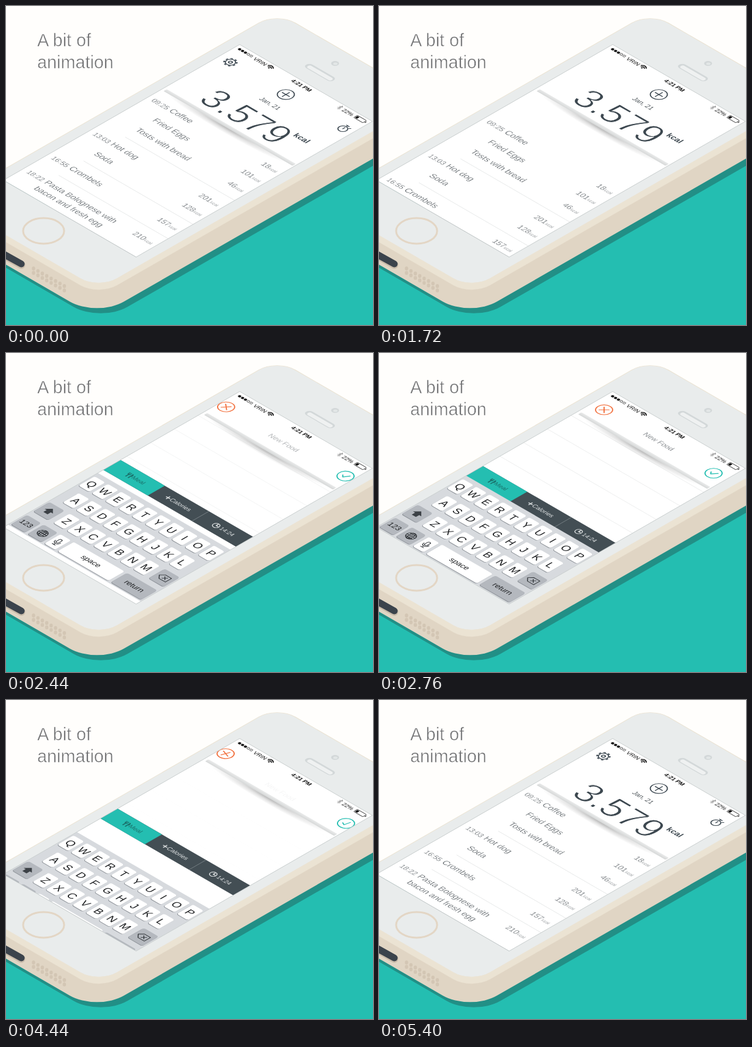
Write an HTML page that moves like this. It is 600x522 px and loops after 5.44 s.

```html
<!DOCTYPE html>
<html lang="en">
<head>
<meta charset="utf-8">
<title>A bit of animation</title>
<style>
html, body { margin: 0; width: 100%; height: 100%; overflow: hidden; background: #fffefc; }
svg { display: block; width: 600px; height: 522px; font-family: "Liberation Sans", Arial, sans-serif; }
.line { fill: none; stroke-width: 2; stroke-linecap: round; stroke-linejoin: round; }
.thin { stroke: #fff; stroke-width: .4; }
.mid { text-anchor: middle; }
.end { text-anchor: end; }
</style>
</head>
<body>
<svg viewBox="0 0 600 522">
  <defs>
    <rect id="face" x="-22" y="-112" width="364" height="792" rx="44" transform="matrix(.678 .393 -.68 .391 382 63)"/>
    <rect id="base" x="-22" y="-112" width="364" height="792" rx="65" transform="matrix(.678 .393 -.68 .391 382 63)"/>
    <clipPath id="glass"><rect width="320" height="568"/></clipPath>
    <clipPath id="below"><rect y="7" width="320" height="30"/></clipPath>
    <radialGradient id="shade">
      <stop offset="0" stop-opacity=".3"/><stop offset=".5" stop-opacity=".11"/><stop offset="1" stop-opacity="0"/>
    </radialGradient>
    <linearGradient id="lip" x2="0" y2="1">
      <stop offset="0" stop-color="#eaebeb"/><stop offset="1" stop-color="#d6d8d8"/>
    </linearGradient>
  </defs>

  <path d="M0 350 600 150V522H0Z" fill="#24beb1"/>
  <use href="#base" x="3" y="54.500" fill="#228f86"/>
  <use href="#base" x="-3" y="46" fill="#e0d5c4"/>
  <use href="#face" y="11" fill="#ebe3d3"/>
  <use href="#face" fill="#e9ecec" stroke="#ebe3d3" stroke-width="1.500"/>
  <path d="M-12 403 25 423.500" stroke="#c9bcaa" stroke-width="13" stroke-linecap="round"/>
  <path d="M-12 401.500 25 422" stroke="#3b434c" stroke-width="11" stroke-linecap="round"/>
  <g id="holes" fill="#d3c6b4"></g>
  <ellipse cx="61.500" cy="368" rx="33.500" ry="21" fill="none" stroke="#e3d6c5" stroke-width="3"/>
  <ellipse cx="538" cy="94" rx="6.500" ry="4" fill="#d3d8d9"/>
  <ellipse cx="538.500" cy="94.500" rx="3.500" ry="2" fill="#e3e7e7"/>

  <text fill="#707173" font-size="28.800" stroke="#fffefc" stroke-width=".6">
    <tspan x="51" y="66">A bit of</tspan><tspan x="51" y="102">animation</tspan>
  </text>

  <g transform="matrix(.678 .393 -.68 .391 382 63)">
    <rect x="122" y="-46" width="66" height="15" rx="7.500" fill="#d3d8d9"/>
    <rect x="127" y="-42" width="58" height="9" rx="4.500" fill="#eff1f1"/>
    <rect width="320" height="568" fill="#fff"/>
    <g clip-path="url(#glass)">
      <g id="list" fill="#50575c" font-size="17.500" class="thin"></g>
      <path id="rules" d="M0 100H320M0 157H320M0 214H320M0 271H320" stroke="#ebecec" fill="none"/>

      <g id="tabs" font-size="13">
        <rect width="320" height="41" fill="#434e54"/>
        <rect width="107" height="41" fill="#24beb1"/>
        <path d="M213.500 0V41" stroke="#7b8489"/>
        <g fill="#1b716b">
          <path d="M37 14h1.500v4h1v-4h1v4h1v-4H43v6l-1.500 1v7h-2.500v-7l-2-1zM45 14q4 0 4 8h-1.500v6H45z"/>
          <text x="50" y="25">Meal</text>
        </g>
        <g fill="#e3e6e7">
          <text x="142" y="25">Calories</text>
          <text x="262" y="25" font-size="12.500">14:24</text>
          <path d="M132 21h8M136 17v8M252 16v5h4" class="line" stroke="#e3e6e7"/>
          <circle cx="252" cy="21" r="6.500" class="line" stroke="#e3e6e7" style="stroke-width:1.500"/>
        </g>
      </g>

      <g id="keyboard"><rect width="320" height="216" fill="#d7dade"/></g>

      <rect id="sheet" width="320" height="182" fill="#fff"/>
      <g id="edge">
        <ellipse cx="160" cy="7" rx="145" ry="15" fill="url(#shade)" clip-path="url(#below)"/>
        <rect x="6" width="311" height="8" rx="2" fill="url(#lip)"/>
      </g>

      <g id="total" fill="#3d4850">
        <text x="160" y="91" font-size="14" class="mid" fill="#50575c">Jan, 21</text>
        <text x="65" y="168" font-size="75" stroke="#fff" stroke-width="1.800">3.579</text>
        <text x="254" y="126" font-size="17" font-weight="700">kcal</text>
      </g>
      <text id="heading" x="160" class="mid thin" font-size="15" fill="#5a6065">New Food</text>

      <g id="gear" class="line" stroke="#434e57">
        <circle r="8.800"/><circle r="3.200"/>
        <circle r="11" pathLength="16" stroke-dasharray="1" stroke-linecap="butt" style="stroke-width:2.600"/>
      </g>
      <g id="timer" class="line" stroke="#434e57">
        <circle r="8.500"/><path d="M0 0V-5M0-9V-12M-3-12H3M7-8 9-10"/>
      </g>
      <g id="plus" class="line" stroke="#434e57"><circle r="14.500"/><path d="M-8.500 0H8.500M0-8.500V8.500"/></g>
      <g id="accept" class="line" stroke="#24beb1"><circle r="14.500"/><path d="M-6 0-2 5 6-5"/></g>
      <g id="cancel" class="line" stroke="#f2713f"><circle r="14.500"/><path d="M-6-6 6 6M-6 6 6-6"/></g>

      <rect width="320" height="20" fill="#fff"/>
      <g id="status" font-size="12" fill="#111">
        <text x="46" y="15">VRIN</text>
        <path d="M78 9q6-6 12 0M80 11.500q4-4 8 0" class="line" stroke="#111"/>
        <circle cx="84" cy="13.500" r="1.500"/>
        <text x="160" y="15" class="mid" font-weight="700">4:21 PM</text>
        <path d="M249 7l6 6-3 3V4l3 3-6 6" class="line" stroke="#999" style="stroke-width:1.200"/>
        <text x="260" y="15">22%</text>
        <rect x="289.500" y="5.500" width="22" height="9" rx="1.500" fill="none" stroke="#222"/>
        <path d="M291 7h5v6h-5zM313 8h1.500v4H313z"/>
      </g>
    </g>
    <rect width="320" height="568" fill="none" stroke="#c3c8c9"/>
  </g>
</svg>
<script>
const $ = id => document.getElementById(id);
const add = (id, markup) => $(id).insertAdjacentHTML('beforeend', markup);

// Static repeats
for (let i = 0; i < 16; i++) {
  const col = i % 8, row = i >> 3;
  add('holes', `<ellipse cx="${45 + col * 7.2}" cy="${429.5 + col * 4.1 + row * 7.2}" rx="2.700" ry="3.200"/>`);
}
for (let i = 0; i < 5; i++) {
  add('status', `<circle cx="${10 + i * 7}" cy="10" r="2.600" stroke="#111" stroke-width=".8" ${i > 2 ? 'fill="none"' : ''}/>`);
}

const meals = [
  [225, '09:25', 'Coffee', 18], [265, '', 'Fried Eggs', 101], [306, '', 'Tosts with bread', 46],
  [366, '13:03', 'Hot dog', 201], [406, '', 'Soda', 128],
  [466, '16:55', 'Crombels', 157],
  [525, '18:22', 'Pasta Bolognese with', 210], [550, '', 'bacon and fresh egg', 0]
];
for (const [y, time, name, kcal] of meals) {
  add('list', `<text x="11" y="${y}" font-size="15">${time}</text><text x="54" y="${y}">${name}</text>`);
  if (kcal) add('list', `<text x="311" y="${y}" class="end" font-size="16">${kcal}<tspan font-size="9.500" dx="1">kcal</tspan></text>`);
}
add('list', '<path d="M56 331H320M56 431H320M56 491H320" stroke="#e4e6e6" stroke-width="1"/>');

function key(x, y, w, label, { gray = false, size = 22, drop = 8 } = {}) {
  add('keyboard', `<rect x="${x}" y="${y + 1.5}" width="${w}" height="39" rx="4.500" fill="#8f949a"/>
    <rect x="${x}" y="${y}" width="${w}" height="39" rx="4.500" fill="${gray ? '#b4b8be' : '#fff'}"/>
    <text x="${x + w / 2}" y="${y + 19.5 + drop}" class="mid" font-size="${size}" fill="#1c1e20">${label}</text>`);
}
[['QWERTYUIOP', 3, 11], ['ASDFGHJKL', 19, 65], ['ZXCVBNM', 51, 119]].forEach(([row, x, y]) =>
  [...row].forEach((letter, i) => key(x + i * 32, y, 26, letter)));
const gray = { gray: true, size: 16, drop: 5 };
key(3, 119, 36, '', gray);
key(281, 119, 36, '', gray);
key(3, 173, 34, '123', gray);
key(43, 173, 34, '', gray);
key(83, 173, 26, '');
key(115, 173, 123, 'space', { size: 16, drop: 5 });
key(244, 173, 73, 'return', gray);
add('keyboard', `<path d="M21 129 31 139H26V147H16V139H11Z" fill="#3c4146"/>
  <g class="line" stroke="#2c3034" style="stroke-width:1.400">
    <path d="M287 138.500 294 131H309V146H294ZM297 135l7 7M304 135l-7 7"/>
    <circle cx="60" cy="192.500" r="9.500"/><ellipse cx="60" cy="192.500" rx="4.500" ry="9.500"/>
    <path d="M50.500 192.500h19M60 183v19M52.500 187.500h15M52.500 197.500h15"/>
    <rect x="93" y="183" width="6" height="12" rx="3"/><path d="M90 191q0 7 6 7t6-7M96 198v4M92.500 202h7"/>
  </g>`);

// Easing
const S = 1.70158;
const quad = p => p * p;
const cubeIn = p => p ** 3;
const cubeOut = p => 1 - (1 - p) ** 3;
const cubeInOut = p => p < .5 ? 4 * p ** 3 : 1 - 4 * (1 - p) ** 3;
const backIn = p => (S + 1) * p ** 3 - S * p * p;
const backOut = p => 1 - backIn(1 - p);
const clamp = v => Math.min(1, Math.max(0, v));

const LOOP = 5440, STEP = 40, TURN = 3440;
const place = (id, x, y, scale = 1, angle = 0) =>
  $(id).setAttribute('transform', `translate(${x} ${y}) rotate(${angle}) scale(${Math.max(0, scale)})`);
const fade = (id, value) => $(id).setAttribute('opacity', clamp(value));

function draw(t) {
  // 0 on the overview, 1 on the entry form
  const run = (start, span, ease, backStart, backSpan, backEase) => t < TURN
    ? ease(clamp((t - start) / span))
    : 1 - backEase(clamp((t - backStart) / backSpan));

  const panel = run(1800, 790, cubeInOut, 4476, 720, backOut);
  place('edge', 0, 181 - 100 * panel);
  $('sheet').setAttribute('height', 182 - 100 * panel);

  const lift = run(1700, 796, cubeInOut, 4476, 720, backOut);
  const shrink = run(1700, 796, cubeInOut, 4440, 650, cubeOut);
  const size = 1 - .8 * shrink;
  place('total', 160 * (1 - size), 141 - 174 * lift - 141 * size, size);

  const tools = 1 - run(1080, 480, backIn, 4720, 680, backOut);
  place('gear', 26, 48, tools);
  place('timer', 300, 51, tools);
  fade('gear', tools * tools);
  fade('timer', tools * tools);

  const split = 132 * run(1912, 800, backOut, 4127, 720, backIn);
  const spin = run(1912, 800, cubeOut, 4127, 720, quad);
  const grow = Math.min(1, .7 + .45 * spin);
  const angle = -135 * (1 - spin);
  place('cancel', 160 - split, 48.5, grow, angle);
  place('accept', 160 + split, 48.5, grow, angle);
  place('plus', 160, 48.5, 1 - .3 * run(1780, 132, quad, 4847, 300, backOut));
  fade('cancel', spin * 8);
  fade('accept', spin * 8);
  fade('plus', 1 - spin * 8);

  place('list', 0, 420 * run(1300, 700, cubeIn, 4640, 660, cubeOut));
  place('tabs', 0, 568 - 256 * run(2096, 620, backOut, 4160, 520, backIn));
  place('keyboard', 0, 568 - 216 * run(2200, 560, backOut, 4080, 480, backIn));

  const form = run(2350, 300, cubeOut, 4200, 250, quad);
  fade('rules', form);
  fade('heading', form);
  $('heading').setAttribute('y', 54 + 14 * (1 - form));
}

const begin = performance.now();
function tick() {
  const t = (performance.now() - begin) % LOOP;
  draw(Math.floor(t / STEP) * STEP);
  requestAnimationFrame(tick);
}
tick();
</script>
</body>
</html>
```
